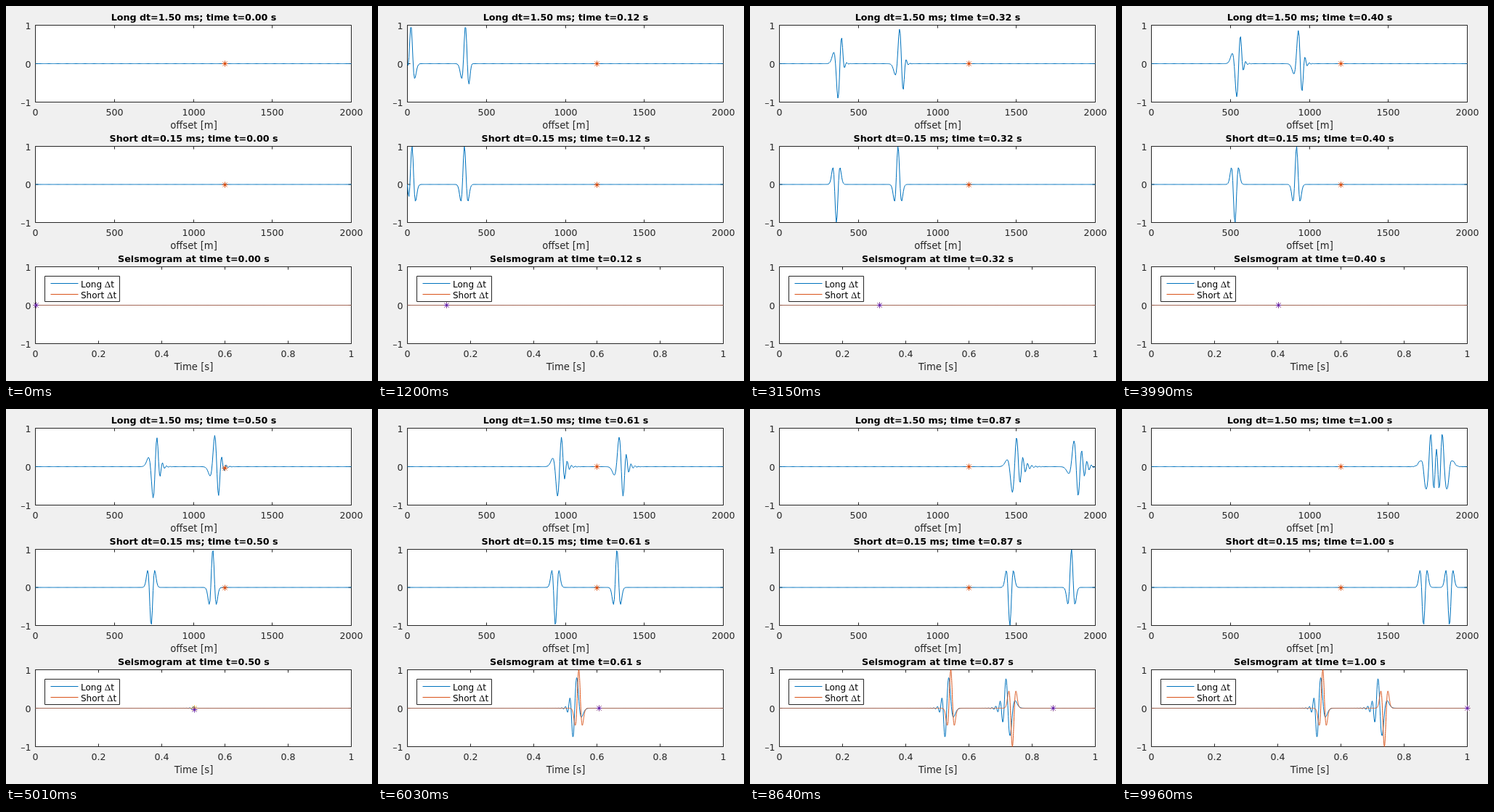
Write an HTML page with a canvas that moves like this. It is 504 px wide and 517 px high and loops after 9.99 s.

```html
<!DOCTYPE html>
<html>
<head>
<meta charset="utf-8">
<style>
html, body { margin: 0; overflow: hidden; background: #f0f0f0; }
canvas { display: block; }
</style>
</head>
<body>
<canvas id="stage" width="504" height="517"></canvas>
<script>
const ctx = document.getElementById('stage').getContext('2d');
const LEFT = 40, WIDTH = 435;
const BLUE = '#0072bd', ORANGE = '#d95319', YELLOW = '#edb120', PURPLE = '#6f2da8';
const INK = '#262626';
const SANS = '"DejaVu Sans", sans-serif';

// Wave model: a Ricker source between two fixed ends
const SPEED = 2000, LENGTH = 2000, SOURCE = 195, RECEIVER = 1200;
const FREQ = 35, DELAY = 0.04, LONG_DT = 0.0015, FRAME_DT = 0.003;

// Spectrum with the wavenumbers of a leapfrog scheme that has a coarse time step
const spectrum = [];
for (let w = 10; w < 700; w += 10) {
  const q = (w / (2 * Math.PI * FREQ)) ** 2;
  spectrum.push({ w, amp: q * Math.exp(-q), k: 2 / (SPEED * LONG_DT) * Math.sin(w * LONG_DT / 2) });
}
const total = spectrum.reduce((sum, s) => sum + s.amp, 0);

function shortPulse(t, d) {
  const a = (Math.PI * FREQ * (t - DELAY - d / SPEED)) ** 2;
  return (1 - 2 * a) * Math.exp(-a);
}

function longPulse(t, d) {
  const age = t - DELAY + 1.5 * LONG_DT, lag = age - d / SPEED;
  if (lag < -0.14 || lag > 0.07) return 0;
  let sum = 0;
  for (const { w, amp, k } of spectrum) sum += amp * Math.cos(w * age - k * d);
  return sum / total;
}

// Direct wave plus the reflections from both ends
const field = (pulse, x, t) =>
  pulse(t, Math.abs(x - SOURCE)) - pulse(t, x + SOURCE) - pulse(t, 2 * LENGTH - SOURCE - x);

function record(pulse, step) {
  const samples = [];
  for (let i = 1; i * step < 1; i++) samples.push([i * step, field(pulse, RECEIVER, i * step)]);
  return samples;
}
const longTrace = record(longPulse, LONG_DT);
const shortTrace = record(shortPulse, LONG_DT / 5);

function text(str, x, y, size, align = 'center', color = INK, family = SANS, weight = '') {
  ctx.font = `${weight} ${size}px ${family}`;
  ctx.textAlign = align;
  ctx.fillStyle = color;
  ctx.fillText(str, x, y);
}

function line(points, color) {
  ctx.strokeStyle = color;
  ctx.beginPath();
  for (const [x, y] of points) ctx.lineTo(x, y);
  ctx.stroke();
}

function star(cx, cy, color) {
  const x = Math.round(cx), y = Math.round(cy);
  for (const [dx, dy] of [[4, 0], [0, 4], [3, 3], [3, -3]])
    line([[x - dx, y - dy], [x + dx, y + dy]], color);
}

function axes(top, bottom, title, label, ticks) {
  const right = LEFT + WIDTH, height = bottom - top;
  ctx.fillStyle = '#fff';
  ctx.fillRect(LEFT, top, WIDTH, height);
  ctx.strokeStyle = INK;
  ctx.strokeRect(LEFT, top, WIDTH, height);
  ticks.forEach((tick, i) => {
    const x = Math.round(LEFT + WIDTH * i / (ticks.length - 1));
    line([[x, top], [x, top + 4]], INK);
    line([[x, bottom], [x, bottom - 4]], INK);
    text(tick, x, bottom + 18, 12.6);
  });
  ['1', '0', '–1'].forEach((tick, i) => {
    const y = top + i * height / 2;
    line([[LEFT, y], [LEFT + 4, y]], INK);
    line([[right, y], [right - 4, y]], INK);
    text(tick, 34, y + 5, 12.6, 'right');
  });
  text(title, 258, top - 7, 12.7, 'center', '#000', SANS, 'bold');
  text(label, 258, bottom + 36, 13.2);
}

function wavePanel(top, bottom, name, pulse, t) {
  const zero = (top + bottom) / 2, half = (bottom - top) / 2;
  const px = x => LEFT + WIDTH * x / LENGTH;
  const py = x => zero - half * field(pulse, x, t);
  axes(top, bottom, `${name}; time t=${t.toFixed(2)} s`, 'offset [m]', [0, 500, 1000, 1500, 2000]);
  const points = [];
  for (let x = 0; x <= LENGTH; x += 5) points.push([px(x), py(x)]);
  line(points, BLUE);
  star(px(RECEIVER), py(RECEIVER), ORANGE);
}

function legendRow(name, y, color) {
  line([[61, y], [99, y]], color);
  text(name + ' ', 102.5, y + 5, 12, 'left', '#000');
  let x = 102.5 + ctx.measureText(name + ' ').width;
  text('Δ', x, y + 5, 13, 'left', '#000', '"Liberation Serif", serif');
  x += ctx.measureText('Δ').width;
  text('t', x, y + 5, 12, 'left', '#000');
}

function seismogram(top, bottom, t) {
  const zero = (top + bottom) / 2, half = (bottom - top) / 2;
  const px = time => LEFT + WIDTH * time;
  axes(top, bottom, `Seismogram at time t=${t.toFixed(2)} s`, 'Time [s]', [0, 0.2, 0.4, 0.6, 0.8, 1]);
  for (const [trace, color] of [[longTrace, BLUE], [shortTrace, ORANGE]]) {
    const points = trace.map(([time, u]) => [px(time), zero - (time < t + 1e-6 ? half * u : 0)]);
    line([[px(0), zero], ...points, [px(1), zero]], color);
  }
  star(px(t), zero - half * field(shortPulse, RECEIVER, t), YELLOW);
  star(px(t), zero - half * field(longPulse, RECEIVER, t), PURPLE);

  ctx.fillStyle = '#fff';
  ctx.fillRect(53, 372, 103, 35);
  ctx.strokeStyle = INK;
  ctx.strokeRect(53, 372, 103, 35);
  legendRow('Long', 382, BLUE);
  legendRow('Short', 397, ORANGE);
}

function draw(now) {
  const t = (Math.floor(now / 30) % 333 + 1) * FRAME_DT;
  ctx.setTransform(1, 0, 0, 1, 0, 0);
  ctx.fillStyle = '#f0f0f0';
  ctx.fillRect(0, 0, 504, 517);
  ctx.translate(0.5, 0.5);
  ctx.lineWidth = 1;
  ctx.lineJoin = 'round';
  wavePanel(26, 132, 'Long dt=1.50 ms', longPulse, t);
  wavePanel(193, 298, 'Short dt=0.15 ms', shortPulse, t);
  seismogram(359, 465, t);
  requestAnimationFrame(draw);
}
requestAnimationFrame(draw);
</script>
</body>
</html>
```
